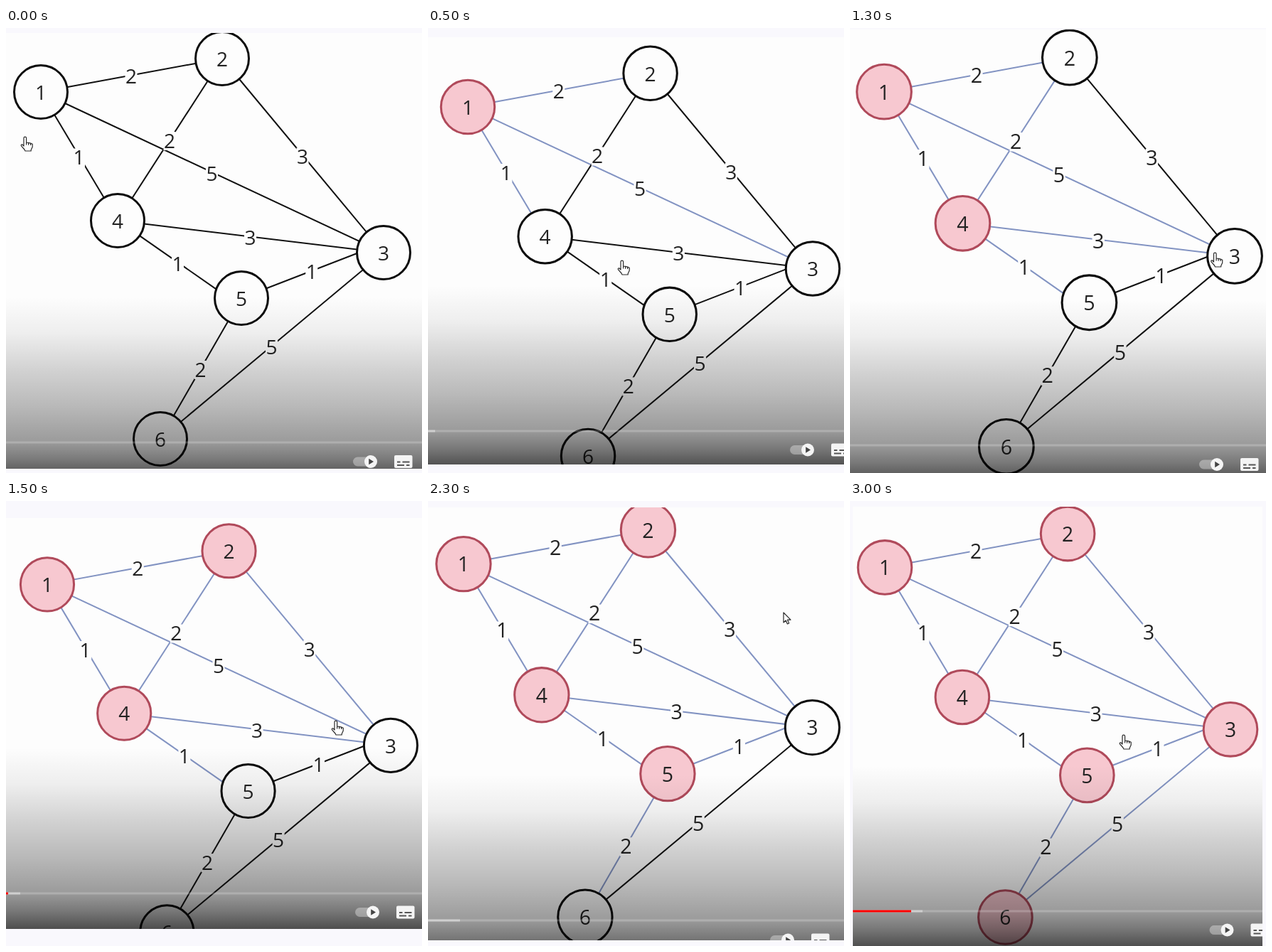
Recreate the animation shown at these times as an HTML page. Size 585 by 626 pixels, loop 3.5 s.

```html
<!DOCTYPE html>
<html lang="en">
<head>
<meta charset="utf-8">
<title>Shortest path walk</title>
<style>
html, body { margin: 0; width: 100%; height: 100%; overflow: hidden; background: #f9f8fd; }
svg { display: block; width: 585px; height: 626px; }
text { font: 28px "Open Sans", "Noto Sans", sans-serif; text-anchor: middle; fill: #222; }
.edge { stroke: #111; stroke-width: 2; }
.edge.on { stroke: #8293c2; }
.node { fill: #fdfdfd; stroke: #0b0b0b; stroke-width: 3; }
.node.on { fill: #f7c8d0; stroke: #b04a5b; }
.cursor { fill: #fff; stroke: #2a2a2a; stroke-width: 1.2; stroke-linejoin: round; }
</style>
</head>
<body>
<svg viewBox="0 0 585 626">
  <defs>
    <clipPath id="crop"><rect id="cropBox"/></clipPath>
    <linearGradient id="fade" x1="0" y1="0" x2="0" y2="1">
      <stop offset="0" stop-opacity="0"/>
      <stop offset=".2" stop-opacity=".06"/>
      <stop offset=".4" stop-opacity=".17"/>
      <stop offset=".6" stop-opacity=".27"/>
      <stop offset=".8" stop-opacity=".39"/>
      <stop offset=".9" stop-opacity=".53"/>
      <stop offset="1" stop-opacity=".7"/>
    </linearGradient>
  </defs>
  <g clip-path="url(#crop)">
    <rect width="585" height="626" fill="#fdfdfd"/>
    <g id="graph"></g>
    <g id="panel">
      <rect y="-205" width="585" height="256" fill="url(#fade)"/>
      <rect y="-1.5" width="585" height="3" fill="#fff" fill-opacity=".2"/>
      <rect id="loaded" y="-1.5" height="3" fill="#fff" fill-opacity=".4"/>
      <rect id="played" y="-1.5" height="3" fill="#f00"/>
    </g>
    <g id="controls">
      <rect x="-25" y="-6.5" width="32" height="13" rx="6.5" fill="#fff" fill-opacity=".35"/>
      <circle r="9" fill="#f4f4f4"/>
      <path d="M-2.8-4.2V4.2L4 0z" fill="#444"/>
      <rect x="33" y="-9" width="25.5" height="18" rx="2" fill="#f4f4f4"/>
      <path d="M37 .5h4.5m3 0h10M37 5h10m3 0h4.5" stroke="#555" stroke-width="2.2"/>
    </g>
    <path id="cursor" class="cursor"/>
  </g>
</svg>
<script>
const STEP = 500;
const nodes = [[49, 90], [304, 43], [531, 316], [157, 271], [331, 380], [217, 578]];
// from, to, weight, optional fixed ends
const edges = [
  [1, 2, 2], [1, 4, 1], [1, 3, 5], [2, 4, 2], [2, 3, 3], [4, 3, 3],
  [4, 5, 1, [187, 291.6, 297, 368.4]],
  [5, 3, 1, [365, 366.8, 495.5, 316.2]],
  [5, 6, 2], [6, 3, 5]
];
const visits = [1, 4, 2, 5, 3, 6];
const hand = "M-2 13V2a1.8 1.8 0 0 1 3.6 0V8l3 .4 3 .7 2.6 1.2v4l-2 4.2V20H0l-1-2-4.5-5.2q-.8-2 1.2-2z" +
  "M1.6 8v3.5M4.6 8.4v3.3M7.6 9.1v3";
const arrow = "M0 0V14l3.2-3 2.2 5 2.3-1-2.2-4.8H10z";
// view: scale, x, y; crop: left, top, right, bottom
const steps = [
  { view: [1, 0, 0], crop: [0, 7, 585, 620], bar: 583, knob: [513, 610], tip: [27, 153] },
  { view: [1.0062, 6.7, 20.5], crop: [0, 13, 585, 614], bar: 567, loaded: 10, knob: [534, 593.5], tip: [273, 327] },
  { view: [1.0228, -2.1, -2.4], crop: [0, 2, 585, 626], bar: 587, knob: [516, 614], tip: [513.5, 316] },
  { view: [1.002, 8.9, 27.2], crop: [0, 24, 585, 602], bar: 552, loaded: 20, played: 3, knob: [516, 578.5], tip: [464, 309] },
  { view: [1.0176, .1, -3], crop: [0, 9, 585, 618], bar: 590, loaded: 45, knob: [506, 617.5], tip: [500, 157], arrow: true },
  { view: [1.0135, .6, -6.5], crop: [0, 6, 585, 621], bar: 586.5, loaded: 66, played: 50, knob: [504, 613], tip: [370, 141] },
  { view: [1.0083, -.4, 2.7], crop: [4, 8, 580, 626], bar: 577, loaded: 102, played: 86, knob: [530.5, 603.5], tip: [385, 329] }
];

const $ = id => document.getElementById(id);
const set = (el, attrs) => {
  for (const key in attrs) el.setAttribute(key, attrs[key]);
  return el;
};
function add(tag, attrs, text = "") {
  const el = set(document.createElementNS("http://www.w3.org/2000/svg", tag), attrs);
  el.textContent = text;
  return $("graph").appendChild(el);
}
const move = (x, y) => `translate(${x} ${y})`;

const ends = edges.map(([a, b, , fixed]) => fixed || [...nodes[a - 1], ...nodes[b - 1]]);
const lines = ends.map(([x1, y1, x2, y2]) => add("line", { class: "edge", x1, y1, x2, y2 }));
ends.forEach(([x1, y1, x2, y2], i) => {
  const x = (x1 + x2) / 2 - .5, y = (y1 + y2) / 2 + 1.5;
  add("rect", { x: x - 8.5, y: y - 12.5, width: 17, height: 26, fill: "#fdfdfd" });
  add("text", { x, y: y + 10 }, edges[i][2]);
});
const discs = nodes.map(([cx, cy], i) => {
  const disc = add("circle", { class: "node", cx, cy, r: 37.5 });
  add("text", { x: cx, y: cy + 10.7 }, i + 1);
  return disc;
});

function show(index) {
  const { view: [scale, x, y], crop: [l, t, r, b], bar, loaded = 0, played = 0, knob, tip, arrow: plain } = steps[index];
  const seen = new Set(visits.slice(0, index));
  discs.forEach((disc, i) => disc.classList.toggle("on", seen.has(i + 1)));
  lines.forEach((line, i) => line.classList.toggle("on", seen.has(edges[i][0]) || seen.has(edges[i][1])));
  set($("graph"), { transform: `${move(x, y)} scale(${scale})` });
  set($("cropBox"), { x: l, y: t, width: r - l, height: b - t });
  set($("panel"), { transform: move(0, bar) });
  set($("loaded"), { width: loaded });
  set($("played"), { width: played });
  set($("controls"), { transform: move(...knob) });
  set($("cursor"), { d: plain ? arrow : hand, transform: move(...tip) });
}

let current = -1;
const start = performance.now();
function tick() {
  const index = Math.floor((performance.now() - start) / STEP) % steps.length;
  if (index !== current) show(current = index);
  requestAnimationFrame(tick);
}
tick();
</script>
</body>
</html>
```
